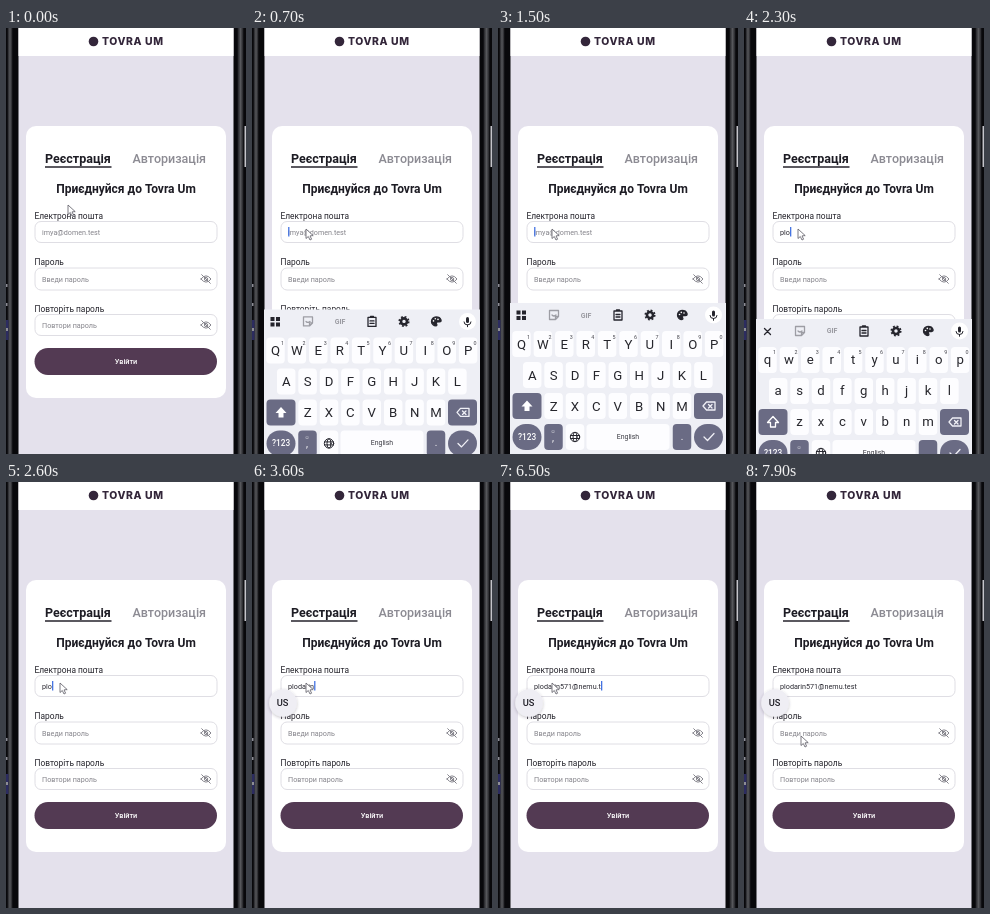
An HTML page that plays this animation: 240x426 px, repeating every 8 s.

```html
<!DOCTYPE html>
<html lang="uk">
<head>
<meta charset="utf-8">
<title>Реєстрація</title>
<style>
  html, body { margin: 0; width: 100%; height: 100%; overflow: hidden; background: #000; }
  svg { display: block; width: 100vw; height: 100vh; }
  #phone { filter: blur(.4px); }
  text { font-family: Roboto, "Noto Sans", sans-serif; fill: #1d1c24; }
  .mid { text-anchor: middle; }
  .brand { font: 800 10.4px Inter, sans-serif; letter-spacing: .6px; fill: #33263a; }
  .tab { font-weight: 700; font-size: 12.5px; }
  .tab.off { fill: #8c8b93; font-weight: 500; }
  .title { font-weight: 700; font-size: 12px; }
  .label { font-size: 8.4px; fill: #24232b; }
  .hint { font-size: 7.2px; fill: #85848b; }
  .typed { font-size: 7.2px; fill: #2b2a33; }
  .field { fill: #fff; stroke: #dfdee4; }
  .icon { fill: none; stroke: #25252d; stroke-width: 1.3; stroke-linecap: round; stroke-linejoin: round; }
  .faded { opacity: .4; }
  .key { fill: #fdfdff; }
  .dark { fill: #6a6b84; }
  .letter { font-size: 13.2px; fill: #26262c; }
  .sup { font-size: 5.4px; fill: #44444c; }

  #keyboard { animation: slide 8s linear infinite; }
  #upper { animation: before 8s step-end infinite; }
  #lower { animation: after 8s step-end infinite; }
  #bubble { animation: pop 8s linear infinite; }
  #pointer { animation: point 8s linear infinite; }

  @keyframes slide {
    0%, 6.25% { transform: translateY(158px); animation-timing-function: ease-out; }
    8.75% { transform: translateY(6.5px); animation-timing-function: ease-out; }
    10.5%, 27% { transform: none; animation-timing-function: ease-in; }
    28.75% { transform: translateY(15.5px); }
    32.5%, 100% { transform: translateY(158px); }
  }
  @keyframes before { 0% { visibility: visible; } 20%, 100% { visibility: hidden; } }
  @keyframes after { 0% { visibility: hidden; } 20%, 100% { visibility: visible; } }
  @keyframes pop { 0%, 36% { opacity: 0; } 37.5%, 100% { opacity: 1; } }
  @keyframes point {
    0%, .6% { transform: translate(62px, 177px); }
    2.5%, 92.5% { transform: translate(54px, 201px); }
    97.5%, 100% { transform: translate(57px, 254px); }
  }
</style>
</head>
<body>
<svg viewBox="0 0 240 426" preserveAspectRatio="none">
  <defs>
    <clipPath id="screen"><path d="M12.500 0h215v426h-215z"/></clipPath>
    <linearGradient id="metal">
      <stop stop-color="#1c1c20"/><stop offset=".5" stop-color="#56575b"/><stop offset="1" stop-color="#1c1c20"/>
    </linearGradient>
    <filter id="soft" x="-50%" y="-50%" width="200%" height="200%">
      <feDropShadow dx="0" dy="1" stdDeviation="1.8" flood-color="#34304a" flood-opacity=".3"/>
    </filter>
    <g id="eye" class="icon" style="stroke:#85848c;stroke-width:1">
      <path d="M-5 0Q0-6.400 5 0Q0 6.400-5 0zM-4.300-4.300L4.300 4.300"/><circle r="1.600"/>
    </g>
  </defs>

  <g id="phone">
  <!-- phone body -->
  <path fill="#08080b" d="M-4-4h248v434h-248z"/>
  <path fill="url(#metal)" d="M1.500-4h5v434h-5z"/>
  <path fill="url(#metal)" d="M231.500-4h6v434h-6z"/>
  <path fill="#c4c4ca" d="M238.500 98h2v41h-2z"/>
  <path fill="#2c2c60" d="M0 292h2.500v20h-2.500z"/>
  <path fill="#8d8d96" d="M0 256h1.500v3h-1.500zM0 275h1.500v3h-1.500zM0 300h2v3h-2z"/>

  <g clip-path="url(#screen)">
    <path fill="#e4e1ec" d="M12 0h216v430h-216z"/>
    <path fill="#fff" d="M12-4h216v32h-216z"/>
    <circle cx="87.500" cy="13.500" r="4.800" fill="#33263a"/>
    <text class="brand" x="96" y="17.200">TOVRA UM</text>

    <rect x="20" y="98" width="200" height="272" rx="10" fill="#fff"/>
    <text class="tab" x="39" y="135">Реєстрація</text>
    <path fill="#24222b" d="M39 138.200h66.500v1.500h-66.500z"/>
    <text class="tab off" x="126.500" y="135">Авторизація</text>
    <text class="title mid" x="120" y="165">Приєднуйся до Tovra Um</text>

    <text class="label" x="28.500" y="191">Електрона пошта</text>
    <rect class="field" x="29" y="193.500" width="182" height="21" rx="6"/>
    <text class="hint" id="hint" x="36" y="206.500">imya@domen.test</text>
    <text class="typed" id="typed" x="36" y="206.500"></text>
    <rect id="caret" y="199" width="1.200" height="9.500" fill="#3568e0"/>

    <text class="label" x="28.500" y="237">Пароль</text>
    <rect class="field" x="29" y="240" width="182" height="22" rx="6"/>
    <text class="hint" x="36" y="253.500">Введи пароль</text>
    <use href="#eye" x="200" y="251"/>

    <text class="label" x="28.500" y="284">Повторіть пароль</text>
    <rect class="field" x="29" y="286.500" width="182" height="21" rx="6"/>
    <text class="hint" x="36" y="299.500">Повтори пароль</text>
    <use href="#eye" x="200" y="297"/>

    <rect x="28.500" y="320" width="182.500" height="27" rx="13.500" fill="#533a53"/>
    <text class="mid" x="120" y="336" style="font-size:7.300px;font-weight:500;fill:#fff">Увійти</text>

    <g id="keyboard">
      <path fill="#eeeff5" d="M12 275h216v170h-216z"/>
      <g class="icon" transform="translate(0 287)">
        <g class="faded"><path d="M51.500-4.500h9v6l-3 3h-6zM60.500 1.500h-3v3"/><path d="M54 0q2 2 4 0"/></g>
        <path d="M116-4h8v9h-8zM118.500-5h3M118-.500h4M118 2h4"/>
        <circle cx="152" r="3" stroke-width="2.600"/>
        <circle cx="152" r="4.700" stroke-width="1.700" stroke-linecap="butt" stroke-dasharray="1.850 1.850"/>
        <path fill="#25252d" d="M184-4.500a4.500 4.500 0 1 0 0 9q1.500-.500.500-2t1-2h2q2 0 1.500-2q-1-3-5-3z"/>
        <g fill="#fff" stroke="none"><circle cx="181.500" cy="-.5" r=".8"/><circle cx="183.300" cy="-2.600" r=".8"/><circle cx="186" cy="-2" r=".8"/></g>
        <circle cx="215.500" r="8.500" fill="#fff" stroke="none"/>
        <path d="M215.500-3v3" stroke-width="3"/><path d="M212 .5q0 3 3.500 3t3.500-3M215.500 3.500v1.800" stroke-width="1"/>
      </g>
      <text class="mid faded" x="88" y="289.500" style="font-size:7px;font-weight:700">GIF</text>
      <g id="keys"></g>
      <g id="upper">
        <path fill="#25252d" d="M18.500 282.500h4v4h-4zM24 282.500h4v4h-4zM18.500 288h4v4h-4zM24 288h4v4h-4z"/>
        <path fill="#fff" d="M29 372.500l5.500 6h-3v4.500h-5v-4.500h-3z"/>
      </g>
      <g id="lower">
        <path class="icon" d="M20.500 284.500l6 6m0-6l-6 6"/>
        <path class="icon" style="stroke:#fff" d="M29 372.500l5.500 6h-3v4.500h-5v-4.500h-3z"/>
      </g>
      <path class="icon" style="stroke:#f0f0f6" d="M205 378l3.500-4h8.500v8h-8.500zM210.500 376.500l3.500 3.500m0-3.500l-3.500 3.500M206 409l3.500 3.500l6.500-7"/>
      <g class="icon" style="stroke-width:1" transform="translate(77 409)">
        <circle r="4.700"/><ellipse rx="2" ry="4.700"/><path d="M-4.500-1.500h9M-4.500 1.500h9"/>
      </g>
      <text class="mid" x="29" y="412" style="font-size:8.300px;font-weight:500;fill:#fff">?123</text>
      <text class="mid" x="55" y="413" style="font-size:10px;fill:#fff">,</text>
      <text class="mid" x="55" y="405" style="font-size:5px;fill:#fff">☺</text>
      <text class="mid" x="130" y="411" style="font-size:6.900px;fill:#3c3c44">English</text>
      <text class="mid" x="184" y="412" style="font-size:10px;fill:#fff">.</text>
    </g>
  </g>

  <g id="bubble">
    <circle cx="31" cy="221" r="13.800" fill="#efeef4" filter="url(#soft)"/>
    <text class="mid" x="30.500" y="224.300" style="font-size:9.300px;font-weight:500">US</text>
  </g>
  <path id="pointer" d="M0 0v9.500l2.300-2l1.700 3.500l1.600-.8l-1.600-3.300l3.200-.3z" fill="#fff" stroke="#5b5a64" stroke-width=".8"/>
  </g>
</svg>

<script>
  const $ = id => document.getElementById(id);
  const NS = 'http://www.w3.org/2000/svg';
  const PITCH = 21.4;

  function add(parent, tag, attrs, content = '') {
    const el = document.createElementNS(NS, tag);
    for (const name in attrs) el.setAttribute(name, attrs[name]);
    el.textContent = content;
    parent.append(el);
  }
  function key(x, y, width = 18.5, look = 'key', rx = 4) {
    add($('keys'), 'rect', { x: x - width / 2, y: y - 13, width, height: 26, rx, class: look });
  }

  ['QWERTYUIOP', 'ASDFGHJKL', 'ZXCVBNM'].forEach((row, r) => {
    const y = 316 + r * 31;
    [...row].forEach((ch, i) => {
      const x = [23.5, 34.2, 55.6][r] + i * PITCH;
      key(x, y);
      add($('upper'), 'text', { x, y: y + 4.8, class: 'letter mid' }, ch);
      add($('lower'), 'text', { x, y: y + 4.3, class: 'letter mid' }, ch.toLowerCase());
      if (!r) add($('keys'), 'text', { x: x + 7, y: y - 5.5, class: 'sup mid' }, (i + 1) % 10);
    });
  });
  key(29, 378, 29, 'dark');
  key(210.5, 378, 29, 'dark');
  key(29, 409, 29, 'dark', 13);
  key(55.5, 409, 18.5, 'dark');
  key(77, 409);
  key(130, 409, 83);
  key(184, 409, 18.5, 'dark');
  key(210.5, 409, 29, 'dark', 13);

  const EMAIL = 'plodarin571@nemu.test';
  // moment of each keystroke, ms
  const STROKES = [1600, 2000, 2200, 2900, 3100, 3200, 3400, 3500, 4700, 4900, 5200,
    5500, 5600, 5700, 5900, 6100, 6300, 6500, 6600, 6700, 6900];

  function draw() {
    const t = performance.now() % 8000;
    const count = STROKES.filter(s => s <= t).length;
    $('typed').textContent = EMAIL.slice(0, count);
    $('hint').style.visibility = count ? 'hidden' : 'visible';
    $('caret').style.visibility = t >= 500 && t < 7500 ? 'visible' : 'hidden';
    $('caret').setAttribute('x', 36.2 + (count ? $('typed').getComputedTextLength() : 0));
    requestAnimationFrame(draw);
  }
  draw();
</script>
</body>
</html>
```
